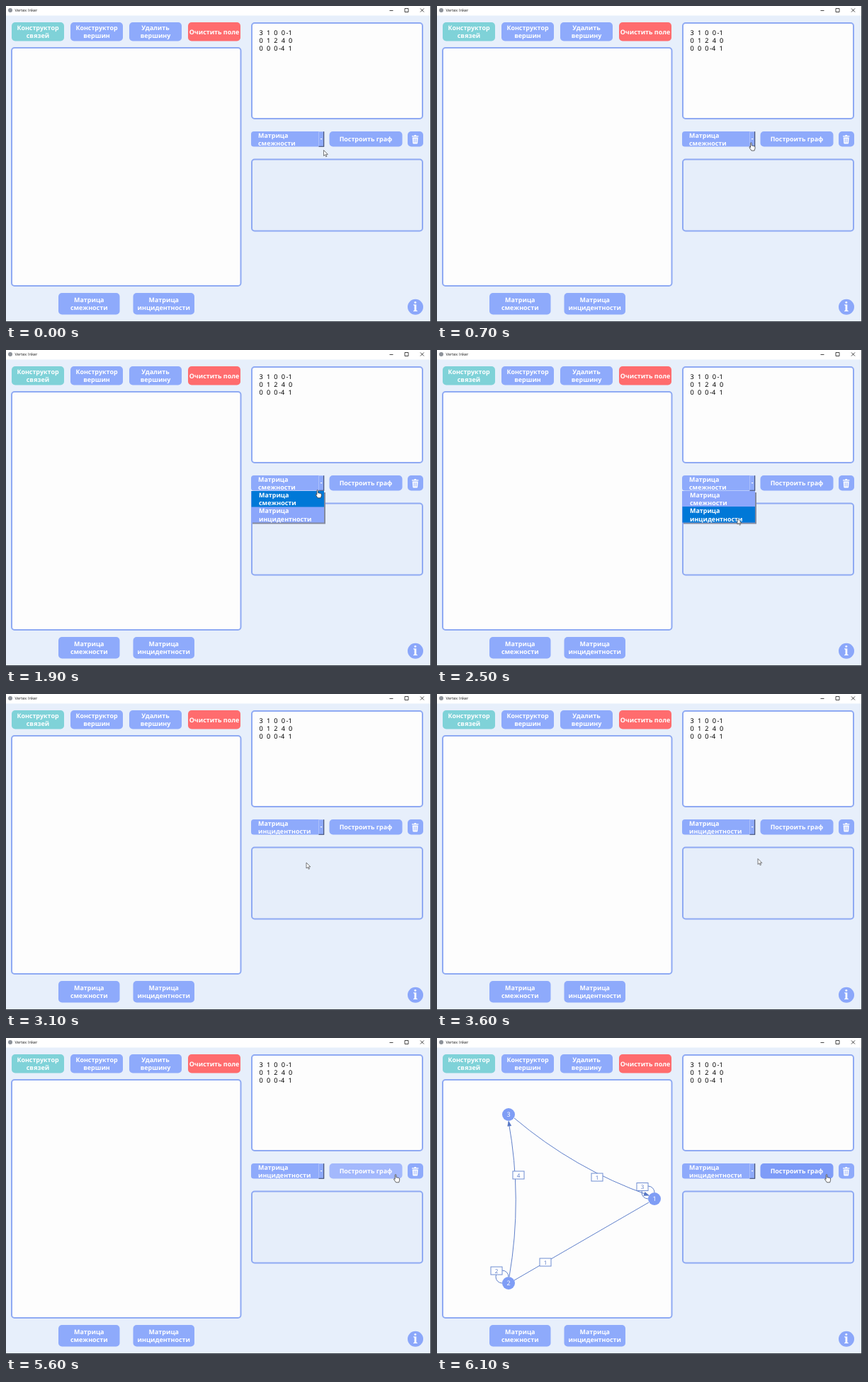
Animation, 600 px wide and 446 px high, one loop 6.5 s. Source, as an HTML page:

```html
<!DOCTYPE html>
<html lang="ru">
<head>
<meta charset="utf-8">
<title>Vertex Inker</title>
<style>
  html, body { margin: 0; width: 100%; height: 100%; overflow: hidden; background: #e7effb; }
  svg { display: block; width: 600px; height: 446px; }
  text { text-rendering: geometricPrecision; }
  .label { font: 700 8.95px "Noto Sans", "Open Sans", sans-serif; fill: #fff; }
  .title { font: 5.7px "Open Sans", "Noto Sans", sans-serif; fill: #222; }
  .matrix { font: 9.2px "Noto Sans", sans-serif; word-spacing: 2.75px; fill: #000; }
  .node { font: 9px "Noto Sans", sans-serif; fill: #fff; text-anchor: middle; }
  .weight { font: 8px "Noto Sans", sans-serif; fill: #5f7fca; text-anchor: middle; }
  .info { font: 700 18px "Noto Serif", serif; fill: #fff; text-anchor: middle; }
  .panel { stroke: #8faaf3; stroke-width: 2; }
  .edge { fill: none; stroke: #6080ca; stroke-width: 1; }
</style>
</head>
<body>
<svg id="stage" viewBox="0 0 600 446">
  <defs>
    <clipPath id="comboClip"><rect x="346" y="177" width="95" height="21"/></clipPath>
    <clipPath id="popupClip"><rect id="popupWindow" x="346" y="198" width="106" height="0"/></clipPath>
  </defs>
  <rect width="600" height="446" fill="#e7effb"/>
  <rect width="600" height="13.5" fill="#fff"/>
  <circle cx="6" cy="6" r="3" fill="#8d9299"/>
  <text class="title" x="12.5" y="8">Vertex Inker</text>
  <path d="M541.5 6.5h5M563 3.5h5v5h-5zM585 3.5l5 5m0-5l-5 5" fill="none" stroke="#333" stroke-width=".9"/>

  <rect class="panel" x="8" y="59" width="323.5" height="336" rx="4" fill="#fdfdfd"/>
  <rect class="panel" x="347" y="24" width="241" height="135" rx="4" fill="#fdfdfd"/>
  <rect class="panel" x="347" y="216.5" width="241" height="101" rx="4" fill="#e6eefa"/>
  <g id="matrix"></g>
  <g id="buttons"></g>

  <g id="trash">
    <rect x="567" y="177" width="22" height="21.5" rx="5" fill="#8eaafb"/>
    <path d="M573 183.2h3l.7-1.2h2l.7 1.2h3v1.4h-9.4zM573.7 185.4h8l-.6 8.2q-.1 1-1 1h-4.8q-.9 0-1-1z" fill="#fff"/>
    <path d="M575.9 187v5.7M577.7 187v5.7M579.5 187v5.7" stroke="#8eaafb" stroke-width=".7"/>
  </g>
  <circle cx="578" cy="424.7" r="11" fill="#8ba7fa"/>
  <text class="info" x="578" y="431">i</text>

  <g id="combo">
    <path d="M449 177h-99q-4 0-4 4v14q0 3.5 4 3.5h99z" fill="#8eaafb"/>
    <g class="label" clip-path="url(#comboClip)">
      <text x="356" y="186.3">Матрица</text>
      <text id="choice" x="356" y="197.3"></text>
    </g>
    <path id="flatCell" d="M441.5 177.5h7v21h-7z" fill="#8ba5f5" stroke="#6f8de0" stroke-width=".8"/>
    <g id="raisedCell" fill="none">
      <path d="M441.5 198.5v-21h7" stroke="#b3c5fc" stroke-width=".8"/>
      <path d="M441.5 198.3h7.2v-21" stroke="#3c4767" stroke-width="1.1"/>
    </g>
    <path d="M443.6 187h3l-1.5 1.8z" fill="#fff"/>
  </g>

  <g id="graph"></g>

  <g id="popup" clip-path="url(#popupClip)">
    <rect id="shadow" x="348" y="201" width="103" height="44.5" fill="#858b9f"/>
    <g id="popupBody">
      <rect x="346" y="199" width="103" height="44.5" fill="#8ba6fb"/>
      <rect id="highlight" x="346.5" width="102.5" height="22.5" fill="#0078d7"/>
      <g id="items" class="label"></g>
    </g>
    <path id="popupEdge" d="M346 199.2h103" stroke="#f0f4fe" stroke-width="1.6"/>
  </g>

  <path d="M599.5 0v446M0 445.5h600" stroke="#3a3f47" stroke-width="1"/>

  <g id="cursor" stroke-linejoin="round">
    <path id="arrow" d="M0 0v8l1.900-1.700 1.300 2.900 1.300-.6-1.300-2.700h2.600z" fill="#fff" stroke="#444" stroke-width=".7"/>
    <path id="hand" d="M-.8 .8q0-.9.8-.9t.8.900v3.200l1.300.2 1.300.3 1.300.4q.9.300.9 1.300v1.800l-.9 3.100h-4.200l-2.800-4.100q-.4-1 .4-1.200l1.100.9z" fill="#fff" stroke="#333" stroke-width=".75"/>
  </g>
</svg>
<script>
const LOOP = 6500, STEP = 100;
const BLUE = "#8eaafb", HOVER = "#7e9cf8", PRESSED = "#a3b8fc";
const $ = id => document.getElementById(id);

function add(parent, tag, attrs, text) {
  const el = document.createElementNS("http://www.w3.org/2000/svg", tag);
  for (const key in attrs) el.setAttribute(key, attrs[key]);
  if (text) el.textContent = text;
  parent.appendChild(el);
  return el;
}

function button(x, y, w, h, fill, lines) {
  const box = add($("buttons"), "rect", { x, y, width: w, height: h, rx: 5, fill });
  lines.forEach((line, i) => add($("buttons"), "text", {
    class: "label", "text-anchor": "middle", x: x + w / 2,
    y: y + h / 2 + 3.6 + (i - (lines.length - 1) / 2) * 11
  }, line));
  return box;
}

button(8, 23, 74, 26.5, "#7fd2d8", ["Конструктор", "связей"]);
button(91, 23, 74, 26.5, BLUE, ["Конструктор", "вершин"]);
button(174, 23, 74, 26.5, BLUE, ["Удалить", "вершину"]);
button(257, 23, 74, 26.5, "#ff6c6e", ["Очистить поле"]);
button(74, 405, 86.5, 30.5, BLUE, ["Матрица", "смежности"]);
button(179.5, 405, 86.5, 30.5, BLUE, ["Матрица", "инцидентности"]);
const build = button(456.5, 177, 103, 21.5, BLUE, ["Построить граф"]);

// A thin space precedes each minus sign.
["3 1 0 0\u2009-1", "0 1 2 4 0", "0 0 0\u2009-4 1"].forEach((row, i) =>
  add($("matrix"), "text", { class: "matrix", x: 357.5, y: 40.8 + i * 11 }, row));

["Матрица", "смежности", "Матрица", "инцидентности"].forEach((line, i) =>
  add($("items"), "text", { x: 357, y: 208.2 + i * 11.1 }, line));

function drawGraph() {
  const g = $("graph");
  const nodes = [[307, 227], [101, 346], [101, 108]];
  const edge = d => add(g, "path", { class: "edge", d });
  const arrowHead = (x, y, angle) => add(g, "path", {
    d: "M0 0L-8 -3V3Z", fill: "#5878c4", transform: `translate(${x} ${y}) rotate(${angle})`
  });
  const weight = (x, y, value) => {
    add(g, "rect", { x: x - 8, y: y - 5.5, width: 16, height: 11, fill: "#fff", stroke: "#6f8dd2" });
    add(g, "text", { class: "weight", x, y: y + 3 }, value);
  };
  edge("M109 113Q194 185 299 222");
  edge("M102 337Q121 227 101 118");
  edge("M299 232L109 342");
  nodes.slice(0, 2).forEach(([x, y]) => edge(`M${x} ${y - 9}a9 9 0 1 0 -9 9`));
  arrowHead(300, 222.5, 19);
  arrowHead(101, 116.5, -99);
  weight(226, 196.5, "1");
  weight(115, 193.5, "4");
  weight(153, 316.5, "1");
  weight(290, 210, "3");
  weight(84, 328.5, "2");
  nodes.forEach(([cx, cy], i) => {
    add(g, "circle", { cx, cy, r: 9, fill: "#7f9df5" });
    add(g, "text", { class: "node", x: cx, y: cy + 3.3 }, String(i + 1));
  });
}
drawGraph();

// Pointer path: time, x, y
const path = [
  [0, 448.5, 203.5], [500, 444.5, 195], [600, 444.5, 195], [800, 442.3, 191],
  [1800, 442.3, 191], [2500, 424, 238], [3300, 424, 238], [3600, 453, 232.5],
  [4000, 503, 220], [4600, 540, 200], [4700, 543, 199.5], [5000, 550, 192.7], [LOOP, 550, 192.7]
];

function pointerAt(t) {
  const i = path.findIndex(p => p[0] > t);
  const [t0, x0, y0] = path[i - 1], [t1, x1, y1] = path[i];
  const k = (t - t0) / (t1 - t0);
  return [x0 + (x1 - x0) * k, y0 + (y1 - y0) * k];
}

const show = (id, visible) => $(id).setAttribute("display", visible ? "inline" : "none");

function render(time) {
  const t = Math.floor((time % LOOP) / STEP) * STEP;
  const [x, y] = pointerAt(t);
  const overControl = y < 199;
  $("cursor").setAttribute("transform", `translate(${x} ${y})`);
  show("hand", overControl);
  show("arrow", !overControl);

  const open = t >= 1200 && t < 2600;
  const slide = Math.min(1, (t - 1200) / 200);
  show("popup", open && slide > 0);
  show("shadow", slide === 1);
  show("popupEdge", slide < 1);
  if (open) {
    $("popupWindow").setAttribute("height", 1 + 49 * slide);
    $("popupBody").setAttribute("transform", `translate(0 ${-43 * (1 - slide)})`);
    $("highlight").setAttribute("y", y > 221 ? 221 : 199);
    show("highlight", slide === 1);
  }
  const held = t >= 1200 && t < 1400;
  show("flatCell", held);
  show("raisedCell", !held);
  $("choice").textContent = t < 2600 ? "смежности" : "инцидентности";

  const pressed = t >= 5600 && t < 5700;
  build.setAttribute("fill", pressed ? PRESSED : t >= 4800 ? HOVER : BLUE);
  show("graph", t >= 5700);
}

const start = performance.now();
function tick() {
  render(performance.now() - start);
  requestAnimationFrame(tick);
}
tick();
</script>
</body>
</html>
```
